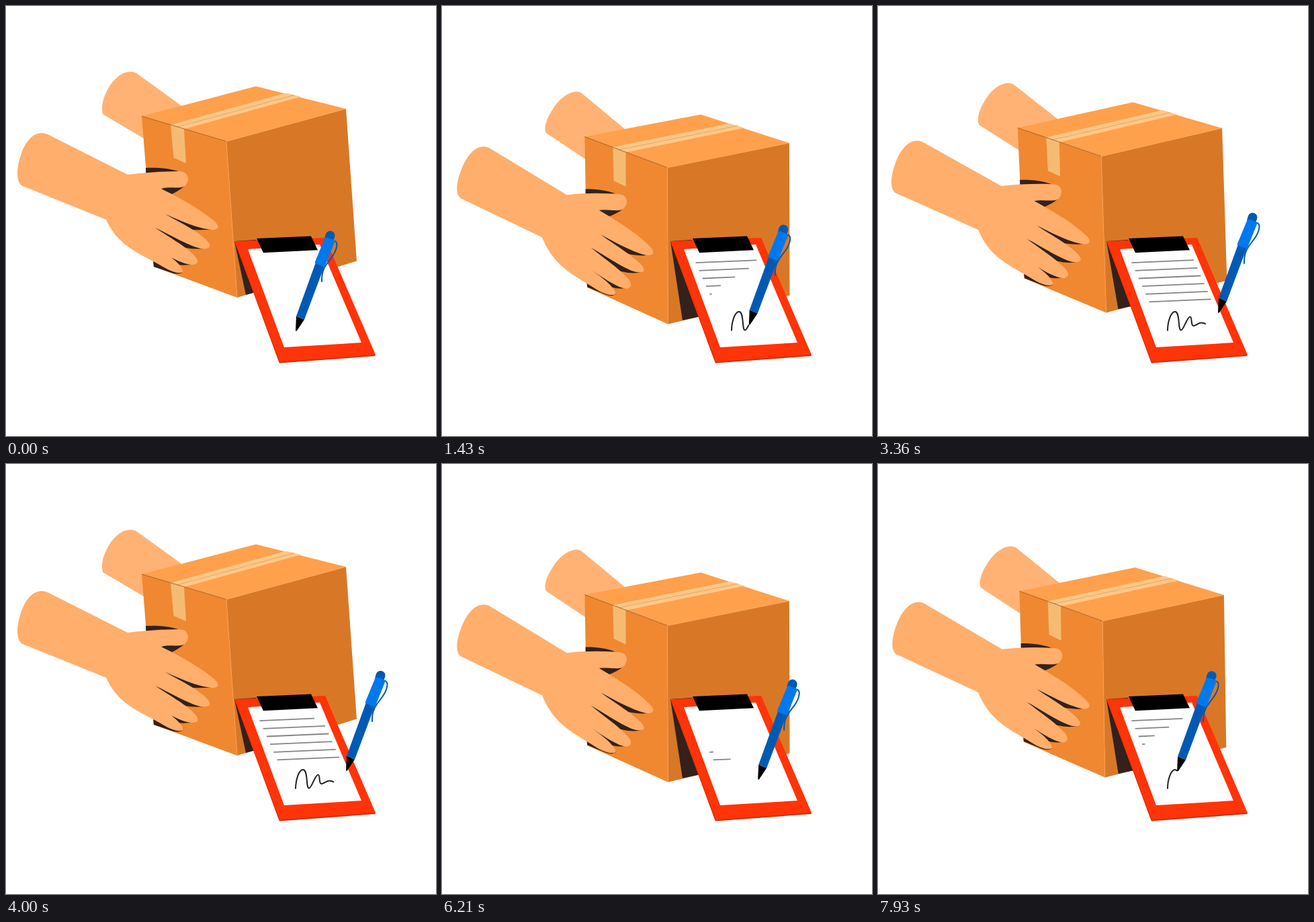
Animation of 640x640 px, one loop 8000 ms. Source, as an HTML page:

```html
<!DOCTYPE html>
<html lang="en">
<head>
<meta charset="utf-8">
<title>Delivery signature</title>
<style>
  html, body { margin: 0; width: 100%; height: 100%; overflow: hidden; background: #fff; }
  svg { display: block; width: 100%; height: 100%; }
  .dark { fill: #33211c; }
</style>
</head>
<body>
<svg viewBox="0 0 640 640">
  <g id="parcel"></g>
  <g id="clipboard">
    <path fill="#d92b00" d="M340 350L342 350L550 519L549 521L407 531.5L405.500 528Z"/>
    <path fill="#ff3408" d="M340 350L475 345L550 519L407.500 529.500Z"/>
    <path fill="#fff" d="M360 362L467 355L529 501L414 508Z"/>
    <path d="M373 346L454 342.500L464 363.300L383 367.300Z"/>
    <g id="lines" stroke="#858585" stroke-width="1.8"></g>
    <path id="sign" fill="none" stroke="#222" stroke-width="2" pathLength="1"
      d="M431 483.500C431 470 436 455 442 455C450 455 446 482.500 451 482.500C455 482.500 460 462.500 464.500 462.500C468 462.500 465 476 469.500 476C473 476 477 471.500 481 471.500C484 471.500 486 472 488 473.500"/>
  </g>
  <g id="pen">
    <path fill="none" stroke="#005ab4" stroke-width="2" d="M56 -134C65 -135 62 -121 54 -110C46 -99 38 -92 39 -73"/>
    <path d="M1 -22L13 -17L2 -.5Q0 1 0 -1Z"/>
    <path fill="#005ab4" d="M1 -22L13 -17L43 -97L30 -102Z"/>
    <circle fill="#005ab4" cx="51.5" cy="-142" r="7"/>
    <path fill="#005ab4" d="M45 -144L58 -140L56 -134L43 -138Z"/>
    <path fill="#0078ee" d="M43 -137Q44 -140 47 -139L56 -136Q59 -135 58 -132L44 -97Q43 -95 41 -96L31 -100Q28 -101 29 -103Z"/>
  </g>
</svg>
<script>
const LOOP = 8000;
const NS = 'http://www.w3.org/2000/svg';
const $ = id => document.getElementById(id);
const lerp = (a, b, p) => a + (b - a) * p;
const smooth = u => u * u * (3 - 2 * u);
const ramp = (t, start, length) => smooth(Math.min(1, Math.max(0, (t - start) / length)));

function add(parent, tag, attrs) {
  const el = document.createElementNS(NS, tag);
  for (const k in attrs) el.setAttribute(k, attrs[k]);
  return parent.appendChild(el);
}

// Each part: attributes, raised pose, lowered pose (same commands).
const dark = { class: 'dark' };
const parts = [
  [{ fill: '#ffb273' },
    'M194 100C181 93 165 103 155 118C144 135 141 151 144 161L210 200L270 155Z',
    'M208 131C196 125 177 137 166 155C154 173 152 186 156 191L220 234L282 193Z'],
  [{ fill: '#ef8831' },
    'M202 164L328 201.5L344 434L220 388Z',
    'M213 196.5L336 243L336 476L216 421Z'],
  [{ fill: '#d87826' },
    'M328 201.5L506 153L522 379.5L344 434Z',
    'M336 243L517.5 207L517.2 434L336 476Z'],
  [{ fill: '#ffa04d' },
    'M202 164L372 119.5L506 153L328 201.5Z',
    'M213 196.5L386 164L517.5 207L336 243Z'],
  [{ fill: '#ffc888' },
    'M245 177L417 129.5L439 135L265.500 183Z',
    'M255 212L429 177.500L451 184.500L274.500 220Z'],
  [{ fill: '#f6bb72' },
    'M245 177L265 183L268 234L249.500 226Z',
    'M255 212L274 220L274 271L256 262Z'],
  [{ fill: 'none', stroke: '#d99b5c', 'stroke-width': .8 },
    'M255 180L429 132.500', 'M264 216L441 181'],
  [{ fill: 'none', stroke: '#96551d', 'stroke-width': .8 },
    'M202 164L328 201.5', 'M213 196.5L336 243'],
  [{ fill: 'none', stroke: '#ffa65c', 'stroke-width': .7 },
    'M506 153L328 201.5L344 434', 'M517.5 207L336 243L336 476'],
  [dark,
    'M340 350L372 348L400 420L368 427L357 430Z',
    'M340 350L372 348L400 461L382 465L358 470Z'],
  [dark,
    'M208 241C230 240 250 243 262 248C275 254 274 267 246 280.5L209 262Z',
    'M214 274.5C235 274 252 278 264 284C280 290 279 305 249 315L214 295Z'],
  [dark,
    'M236 309L313 331Q300 334 278 333L250 322Z',
    'M236 342L313 372Q300 376 276 371L250 357Z'],
  [dark,
    'M222 330L301 360Q285 363 268 360L235 345Z',
    'M221 361L299 398Q284 402 265 397L235 378Z'],
  [dark,
    'M217 358L284 383Q270 387 254 385L230 373Z',
    'M214 390L279 421Q266 425 250 420L228 405Z'],
  [dark,
    'M219 380L220 388L246 397Q255 400 262 397L225 378Z',
    'M215 412L216 420L242 431Q252 435 258 431L222 408Z'],
  [{ fill: '#ffae6b' },
    `M62 191C45 183 29 199 22 222C14 246 16 264 25 268L149 318
     C155 331 163 343 176 354C192 367 214 377 230 386C246 396 260 400 263 395
     C264 388 243 368 217 358C240 371 262 385 278 385C289 384 287 377 276 367
     C262 355 240 342 222 330C245 341 272 357 290 361C306 363 307 356 296 346
     C279 331 256 321 236 309C262 321 285 331 305 333C317 334 319 328 310 320
     C290 303 256 284 231 272C245 268 256 273 266 268C274 261 273 247 258 246
     C235 246 205 248 181 251Z`,
    `M70 212C53 205 38 222 29 245C20 268 21 284 29 288L149 346
     C155 361 163 375 177 388C192 402 211 412 225 421C240 431 255 435 258 430
     C258 422 238 404 214 390C238 404 258 421 274 423C285 421 282 412 272 403
     C257 388 238 375 221 361C244 374 270 393 288 398C303 401 304 394 293 384
     C277 369 256 357 236 342C260 355 283 368 303 373C316 375 318 368 308 359
     C288 338 258 321 234 306C248 304 262 309 270 304C278 297 278 282 262 282
     C238 280 210 280 186 283Z`]
].map(([attrs, up, down]) => ({
  el: add($('parcel'), 'path', attrs),
  up,
  ends: down.match(/[\d.]+/g).map(Number)
}));

function pose(part, p) {
  let i = 0;
  part.el.setAttribute('d', part.up.replace(/[\d.]+/g, n => lerp(+n, part.ends[i++], p).toFixed(2)));
}

const lines = Array.from({ length: 6 }, (_, i) => {
  const x = 377.5 + 5.2 * i, y = 382.2 + 11.65 * i;
  return { x, y, el: add($('lines'), 'line', { x1: x, y1: y }) };
});

const sign = $('sign'), signLength = sign.getTotalLength();
const rest = { x: 506, y: 456.5 }, home = { x: 431, y: 483.5 };
const mix = (a, b, p) => ({ x: lerp(a.x, b.x, p), y: lerp(a.y, b.y, p) });

// Eased progress of a cubic-bezier(x1, 0, x2, 1), solved by bisection.
function bezier(u, x1, x2) {
  let lo = 0, hi = 1;
  for (let i = 0; i < 24; i++) {
    const s = (lo + hi) / 2, r = 1 - s;
    if (3 * x1 * s * r * r + 3 * x2 * s * s * r + s * s * s < u) lo = s; else hi = s;
  }
  return smooth(lo);
}

const BACK = 4570, RESTART = 7500;

function penTip(t, drawn) {
  if (t >= BACK && t < RESTART) return mix(rest, home, bezier((t - BACK) / (RESTART - BACK), .45, .75));
  const p = sign.getPointAtLength(drawn * signLength);
  return t < BACK ? mix(p, rest, ramp(t, 1967, 1400)) : p;
}

const MOVE = 1220;

function render(t) {
  const lowered = ramp(t, 390, MOVE) - ramp(t, 2778, MOVE) + ramp(t, 5170, MOVE) - ramp(t, 7558, MOVE);
  parts.forEach(part => pose(part, lowered));

  lines.forEach(({ x, y, el }, i) => {
    const n = ramp(t, 13 + 310 * i, 1550) - ramp(t, 3669 + 308 * i, 1540) + ramp(t, 6798 + 310 * i, 1550);
    el.setAttribute('x2', x + 92.5 * n);
    el.setAttribute('y2', y - 4 * n);
    el.style.display = n > .001 ? '' : 'none';
  });

  const again = t >= RESTART;
  const drawn = again ? ramp(t, RESTART, 1200) : ramp(t, 755, 1200);
  const erased = again ? 0 : ramp(t, 4010, 1100);
  sign.setAttribute('stroke-dasharray', `0 ${erased} ${drawn - erased} 2`);
  sign.style.display = drawn - erased > .001 ? '' : 'none';

  const tip = penTip(t, drawn);
  $('pen').setAttribute('transform', `translate(${tip.x} ${tip.y + .2})`);
}

const begin = performance.now();
function tick() {
  render((performance.now() - begin) % LOOP);
  requestAnimationFrame(tick);
}
tick();
</script>
</body>
</html>
```
